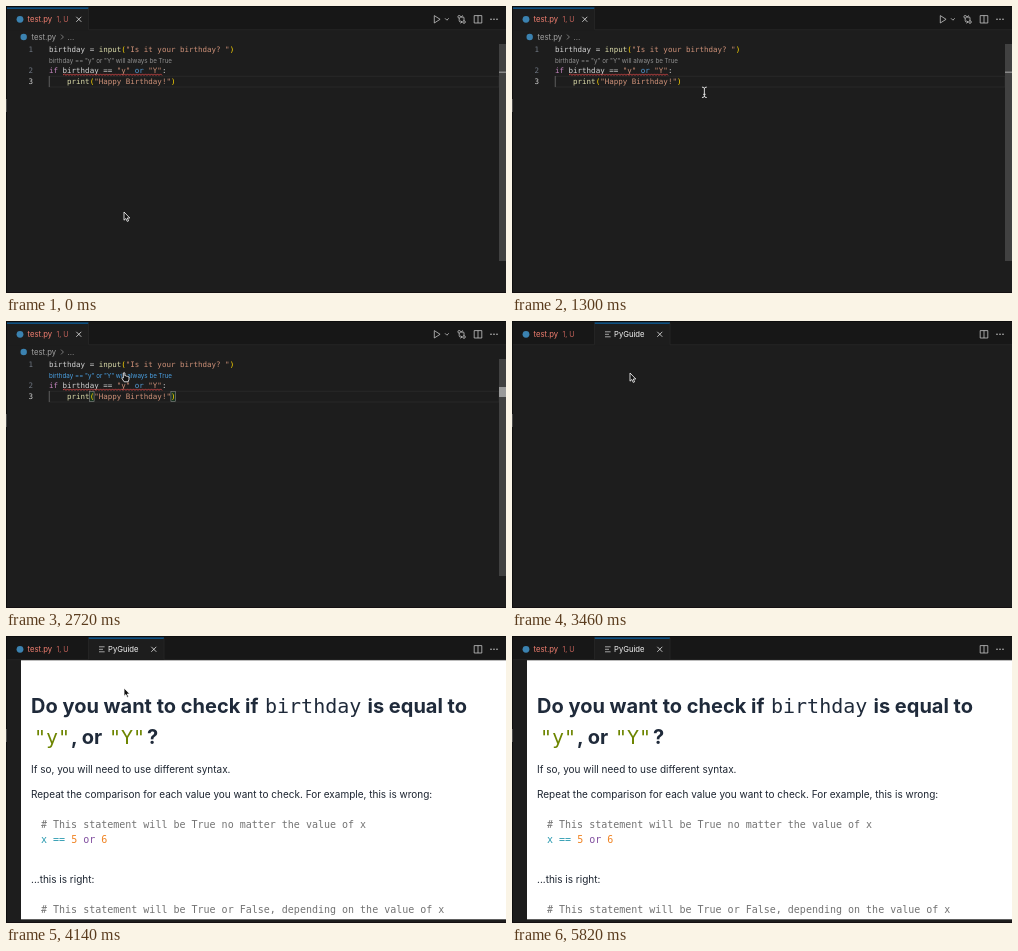
Write an HTML page that moves like this. It is 500x287 px and loops after 5840 ms.

```html
<!DOCTYPE html>
<html lang="en">
<head>
<meta charset="utf-8">
<title>Editor hint</title>
<style>
  html, body { margin: 0; width: 100%; height: 100%; overflow: hidden; background: #1d1d1d; }
  svg { display: block; width: 500px; height: 287px; }
  text { white-space: pre; font-family: Inter, "Open Sans", sans-serif; }
  .mono { font-family: "DejaVu Sans Mono", monospace; }
  .code { font-size: 7.5px; fill: #d4d4d4; }
  .sample { font-size: 10px; }
  .body { font-size: 10px; fill: #1c2430; }
  .h1 { font-size: 20px; fill: #1f2a3a; font-weight: 700; }
  .h1.mono { font-weight: 400; }
  .ui { font-size: 7.7px; }
  .small { font-size: 7px; }
  .icon { fill: none; stroke: #c5c5c5; stroke-width: .8; }
  .fn { fill: #dcdcaa; } .str { fill: #ce9178; } .br { fill: #ffd700; }
  .key { fill: #c586c0; } .op { fill: #569cd6; }
  .olive { fill: #6d8500; } .teal { fill: #2b9ab0; } .num { fill: #f08322; } .or { fill: #8250a0; }
  .note { fill: #737373; }
</style>
</head>
<body>
<svg viewBox="0 0 500 287">
  <rect width="500" height="287" fill="#1d1d1d"/>
  <rect width="500" height="24" fill="#171717"/>

  <g id="editor">
    <rect x="1" y="2" width="81.5" height="22.5" fill="#1d1d1d"/>
    <rect x="1" y="1.6" width="81.5" height="1" fill="#0873c4"/>
    <path d="M82.5 2V23.7H500" fill="none" stroke="#2a2a2a" stroke-width=".7"/>
    <path class="icon" d="M70.3 10.8l5 5m0-5l-5 5" style="stroke:#e6e6e6"/>
    <circle cx="17.7" cy="31" r="3.2" fill="#3b82b0"/>
    <text class="ui" x="25.5" y="33.8" fill="#a3a3a3">test.py</text>
    <path class="icon" d="M55 28.6l2.4 2.4l-2.4 2.4" style="stroke:#909090"/>
    <text class="ui" x="61.5" y="33.8" fill="#a3a3a3">...</text>
    <path class="icon" d="M428.3 9.6v7.4l5.8-3.7zM439 12.3l1.9 1.9l1.9-1.9"/>
    <g class="icon">
      <circle cx="453.2" cy="10.8" r="1.3"/><circle cx="458" cy="16" r="1.3"/>
      <path d="M453.2 12.1v2.6q0 1.3 1.3 1.3h1.3m-1.2-1.4l1.3 1.4l-1.3 1.4M458 14.7v-2.6q0-1.3-1.3-1.3h-1.3m1.2-1.4l-1.3 1.4l1.3 1.4"/>
    </g>

    <rect x="43" y="70.2" width="450" height="10.8" fill="none" stroke="#2b2b2b" stroke-width=".8"/>
    <path d="M43.3 70V81" stroke="#707070" stroke-width=".7"/>
    <g class="mono code" text-anchor="end">
      <text class="mono" x="27" y="46.2" fill="#6e7681">1</text>
      <text class="mono" x="27" y="66.8" fill="#6e7681">2</text>
      <text class="mono" x="27" y="78" fill="#d0d0d0">3</text>
    </g>
    <text class="mono code" x="43" y="46.2">birthday = <tspan class="fn">input</tspan><tspan class="br">(</tspan><tspan class="str">"Is it your birthday? "</tspan><tspan class="br">)</tspan></text>
    <text id="hint" x="43" y="56.6" font-size="6.25">birthday == "y" or "Y" will always be True</text>
    <text class="mono code" x="43" y="66.8"><tspan class="key">if</tspan> birthday == <tspan class="str">"y"</tspan> <tspan class="op">or</tspan> <tspan class="str">"Y"</tspan>:</text>
    <path id="wave" fill="none" stroke="#f14c4c" stroke-width=".8"/>
    <g id="match" fill="#17301f" stroke="#8a8a8a" stroke-width=".6">
      <rect x="83.6" y="70.6" width="4.5" height="10"/>
      <rect x="164.9" y="70.6" width="4.5" height="10"/>
    </g>
    <text class="mono code" x="43" y="78">    <tspan class="fn">print</tspan><tspan class="br">(</tspan><tspan class="str">"Happy Birthday!"</tspan><tspan class="br">)</tspan></text>
    <rect id="caret" x="169.2" y="70.2" width="1" height="10.8" fill="#e0e0e0"/>

    <rect x="493" y="38" width="7" height="217" fill="#414141"/>
    <rect id="ruler" x="493" width="7" fill="#9a9a9a"/>
  </g>

  <g id="guide">
    <rect x="82.5" y="2" width="75.5" height="22.5" fill="#1d1d1d"/>
    <rect x="82.5" y="1.6" width="75.5" height="1" fill="#0873c4"/>
    <path d="M0 23.7H82.5V2M158 2V23.7H500" fill="none" stroke="#2a2a2a" stroke-width=".7"/>
    <path class="icon" d="M93 10.8h5.6M93 13.3h4M93 15.8h5.6"/>
    <text class="ui" x="102" y="16" fill="#f2f2f2">PyGuide</text>
    <path class="icon" d="M145.3 10.8l5 5m0-5l-5 5" style="stroke:#e6e6e6"/>
  </g>

  <g id="page">
    <rect x="15" y="24.3" width="485" height="259" fill="#fff"/>
    <text class="h1" x="25" y="77.4">Do you want to check if</text>
    <text class="h1 mono" x="259" y="77.4">birthday</text>
    <text class="h1" x="361.5" y="77.4">is equal to</text>
    <text class="h1 mono olive" x="28" y="108" style="fill:#6d8500">"y"</text>
    <text class="h1" x="65" y="108">, or</text>
    <text class="h1 mono" x="103" y="108" style="fill:#6d8500">"Y"</text>
    <text class="h1" x="141" y="108">?</text>
    <text class="body" x="25" y="136.6">If so, you will need to use different syntax.</text>
    <text class="body" x="25" y="161.6">Repeat the comparison for each value you want to check. For example, this is wrong:</text>
    <text class="mono sample note" x="35" y="191.6"># This statement will be True no matter the value of x</text>
    <text class="mono sample" x="35" y="206.8"><tspan class="teal">x ==</tspan> <tspan class="num">5</tspan> <tspan class="or">or</tspan> <tspan class="num">6</tspan></text>
    <text class="body" x="25" y="246.6">...this is right:</text>
    <text class="mono sample note" x="35" y="276.8"># This statement will be True or False, depending on the value of x</text>
  </g>

  <circle cx="14" cy="13.3" r="3.4" fill="#3b82b0"/>
  <text class="ui" x="21.5" y="16" fill="#f27f70">test.py</text>
  <text class="small" x="50.5" y="16" fill="#c4625a">1, U</text>
  <path class="icon" d="M468.2 9.6h7.6v7.4h-7.6zM472 9.6v7.4"/>
  <g fill="#c5c5c5"><circle cx="485" cy="13.3" r=".8"/><circle cx="488" cy="13.3" r=".8"/><circle cx="491" cy="13.3" r=".8"/></g>
  <path d="M0 .5H500M.4 0V287" stroke="#0d0d0d"/>
  <rect y="93" width="1" height="13" fill="#4a4a4a"/>
  <rect y="286" width="500" height="1" fill="#141012"/>

  <g id="pointer">
    <path id="arrow" d="M0 0V8.2L1.9 6.5L3.2 9.4L4.6 8.8L3.3 6H5.8Z" fill="#111" stroke="#fff" stroke-width=".8"/>
    <path id="beam" d="M-2.4 -5.2Q0 -5.2 0 -3.8Q0 -5.2 2.4 -5.2M0 -4V4M-2.4 5.2Q0 5.2 0 3.8Q0 5.2 2.4 5.2M-1.2 2H1.2" fill="none" stroke="#f0f0f0" stroke-width=".9"/>
    <path id="hand" d="M-.7 0Q.2 -1 .9 0V2.8Q2 2.2 2.5 3.2Q3.5 2.7 3.9 3.7Q5 3.5 5 4.6V6.3L4.2 8.8H.2L-2 5.6Q-2.2 4.4 -.7 5Z" fill="#111" stroke="#fff" stroke-width=".8"/>
  </g>
</svg>
<script>
const LOOP = 5840, CLICK = 1740, OPEN = 3200, RENDER = 3700, LEAVE = 5640;

// Pointer stops: time, x, y
const stops = [
  [0, 118, 206], [600, 118, 206], [680, 81, 173], [780, 84, 160],
  [1200, 186, 88], [1460, 205, 83], [1800, 205, 83], [1980, 114, 83.5],
  [2160, 114, 82], [2400, 117, 64], [2600, 118, 52]
];

const part = {};
document.querySelectorAll("[id]").forEach(e => part[e.id] = e);
const show = (name, on) => { part[name].style.display = on ? "" : "none"; };

let wave = "M57 69";
for (let i = 1; i <= 66; i++) wave += `L${57 + i * 1.5} ${i % 2 ? 67.9 : 69.4}`;
part.wave.setAttribute("d", wave);

function place(t) {
  const i = stops.findIndex(s => s[0] > t);
  if (i < 0) return stops[stops.length - 1].slice(1);
  const [t0, x0, y0] = stops[i - 1], [t1, x1, y1] = stops[i];
  const p = (t - t0) / (t1 - t0), k = p * p * (3 - 2 * p);
  return [x0 + (x1 - x0) * k, y0 + (y1 - y0) * k];
}

function draw(t) {
  const [x, y] = place(t);
  const inEditor = t < OPEN, focused = t >= CLICK;
  const overHint = inEditor && y < 58;
  const overCode = inEditor && !overHint && y < 92;

  show("editor", inEditor);
  show("guide", !inEditor);
  show("page", t >= RENDER);
  show("match", focused);
  show("caret", focused && (t - CLICK) % 1000 < 500);
  part.hint.setAttribute("fill", overHint ? "#4a9fe0" : "#8f8f8f");
  part.ruler.setAttribute("y", focused ? 66 : 65.6);
  part.ruler.setAttribute("height", focused ? 10 : 1.2);

  show("pointer", t < LEAVE);
  show("hand", overHint);
  show("beam", overCode);
  show("arrow", !overHint && !overCode);
  part.pointer.setAttribute("transform", `translate(${x} ${y})`);
}

const start = performance.now();
function tick() {
  draw((performance.now() - start) % LOOP);
  requestAnimationFrame(tick);
}
draw(0);
requestAnimationFrame(tick);
</script>
</body>
</html>
```
